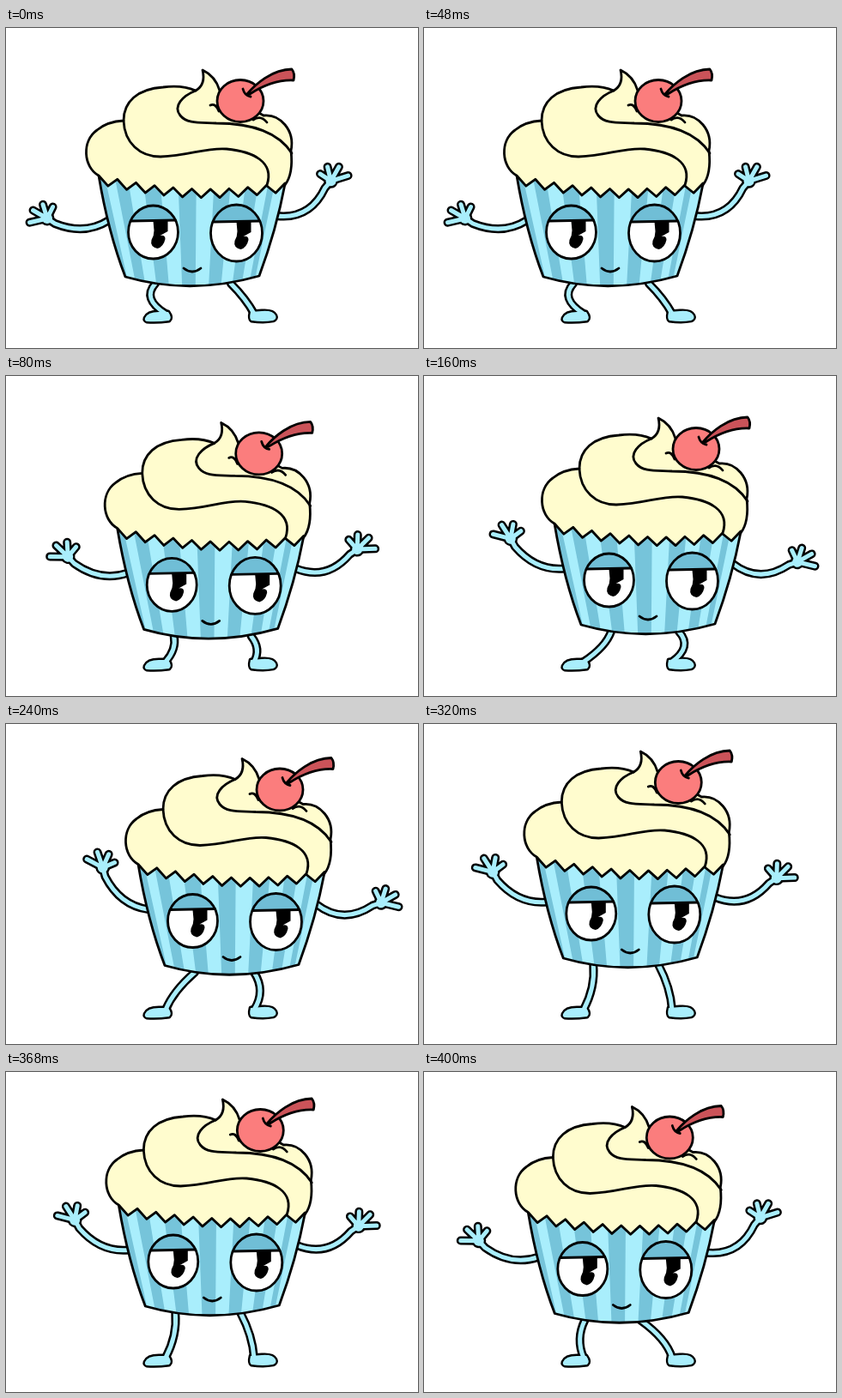
Write an HTML page that moves like this. It is 480 px wide and 373 px high and loops after 480 ms.

```html
<!DOCTYPE html>
<html lang="en">
<head>
<meta charset="utf-8">
<title>Dancing cupcake</title>
<style>
html, body { margin: 0; width: 100%; height: 100%; overflow: hidden; background: #fff; }
svg { display: block; width: 100%; height: 100%; }
path, ellipse { stroke-linecap: round; stroke-linejoin: round; }
.ink { fill: none; stroke: #000; stroke-width: 2.8; }
</style>
</head>
<body>
<svg viewBox="0 0 480 373">
  <g id="legs"></g>
  <g id="body">
    <g id="armL"></g>
    <g id="armR"></g>
    <clipPath id="cupClip"><use href="#cup"/></clipPath>
    <path id="cup" d="M108 172Q119 238 139 290Q215 312 295 289Q315 235 325 182Z" fill="#a9eefc"/>
    <path id="stripes" clip-path="url(#cupClip)" fill="#76c4da"/>
    <path class="ink" d="M108 172Q119 238 139 290Q215 312 295 289Q315 235 325 182"/>
    <path id="cream" class="ink" style="fill:#fffcce"/>
    <path class="ink" d="M137 108C138 134 156 150 180 150C214 149 232 139 257 141C288 144 313 156 304 183
      M221 73C206 79 194 91 203 102C211 112 226 110 245 111C285 111 317 121 333 146
      M238 90Q244 87 248 97M288 107Q297 101 304 110"/>
    <ellipse cx="273" cy="85" rx="27" ry="24.5" class="ink" style="fill:#fb7d7d"/>
    <path class="ink" style="fill:#cb5359" d="M281 77C290 66 310 48 333 48Q337 53 335 61C315 60 298 68 284 77Z"/>
    <path class="ink" d="M276 71Q278 79 285 80"/>
    <g id="eyes"></g>
    <path class="ink" d="M207 280Q217 288 227 280"/>
  </g>
</svg>
<script>
const $ = id => document.getElementById(id);
const SKIN = '#a9eefc';

// Outlined limb: a black layer below a slimmer coloured one.
const stroke = (d, color, width) => `<path d="${d}" fill="none" stroke="${color}" stroke-width="${width}"/>`;
const limb = (line, blob) => stroke(line, '#000', 10) +
  `<path d="${blob}" stroke="#000" stroke-width="4.8"/>` +
  stroke(line, SKIN, 5) + `<path d="${blob}" fill="${SKIN}"/>`;

// Arm ending in a palm with four fingers fanned out from an angle in degrees.
function arm(line, x, y, angle, turn) {
  for (let i = 0; i < 4; i++) {
    const a = (angle + turn * i * 43) * Math.PI / 180, r = 21 - 2 * i;
    line += `M${x} ${y}L${x + r * Math.cos(a)} ${y + r * Math.sin(a)}`;
  }
  return limb(line, `M${x - 6} ${y}a6 6 0 1 1 12 0a6 6 0 1 1 -12 0Z`);
}
$('armL').innerHTML = arm('M120 224Q92 242 57 228L48 222', 48, 222, 167, 1);
$('armR').innerHTML = arm('M315 219Q354 224 372 187L379 179', 379, 179, -17, -1);

const eye = (x, y, rx, ry) => `
  <g transform="translate(${x} ${y})">
    <ellipse rx="${rx}" ry="${ry}" fill="#fff"/>
    <path d="M${3 - rx} -14A${rx} ${ry} 0 0 1 ${rx - 3} -14Z" fill="#70bed6"/>
    <path d="M0 -13H17V-1L8 4Q14 3 14 8Q12 17 5 19Q-4 17 -2 9Q1 4 1 -2Z"/>
    <path class="ink" d="M${3 - rx} -13L${rx - 3} -14"/>
    <ellipse rx="${rx}" ry="${ry}" class="ink"/>
  </g>`;
$('eyes').innerHTML = eye(171.5, 238, 29, 31) + eye(268.5, 239, 30, 33);

// Stripes evenly spaced around a tapering cylinder.
let stripes = '';
for (let a = -1.2; a < 1.3; a += 0.4) {
  const l = Math.sin(a - 0.1), r = Math.sin(a + 0.1);
  stripes += `M${211 + 108 * l} 172L${211 + 108 * r} 172L${213 + 78 * r} 302L${213 + 78 * l} 302Z`;
}
$('stripes').setAttribute('d', stripes);

// Toothed lower rim of the cream, from right to left.
let rim = '';
for (let i = 20; i >= 0; i--) {
  const y = 172 + 9 * i / 20 + 11 * Math.sin(Math.PI * i / 20) + i % 2 * 10;
  rim += `L${108 + i * 10.85} ${y}`;
}
$('cream').setAttribute('d', `M108 172C90 162 88 132 106 119Q118 109 137 108
  C137 86 153 71 183 69Q205 66 221 73Q233 66 229 49Q244 56 249 73L300 102
  C319 100 337 119 332 143Q335 170 325 183${rim}Z`);

const footL = 'M162 338Q165 331 178 331L189 331Q194 338 190 341Q176 343 164 342Q161 341 162 338Z';
const footR = 'M285 331Q283 339 286 341Q300 343 311 341Q316 339 314 335Q311 329 298 330Z';

// Leg curving from hip to ankle, its middle pushed sideways by bend.
const leg = (hx, hy, ax, ay, bend) =>
  `M${hx} ${hy}Q${(hx + ax) / 2 + 2 * bend} ${(hy + ay) / 2} ${ax} ${ay}`;

// Body shift, left and right knee bend, right hip.
const poses = [
  [0, 0, -11, 2, 262],
  [21.7, 5.4, 4, 5, 264],
  [44, 0, 5, 10, 253],
  [46, -8.5, -4, 7, 243],
  [23.3, -17, 4, 3, 250],
  [13.3, -8.5, -5, 6, 239]
];

function pose(step) {
  const [x, y, bendL, bendR, hip] = poses[step];
  const left = 41 * (1 - Math.abs(step - 3) / 3);
  const right = 15 + 18 * Math.cos((step - 2.5) * Math.PI / 3);
  $('body').setAttribute('transform', `translate(${x} ${y})`);
  $('armL').setAttribute('transform', `rotate(${left} 119 224)`);
  $('armR').setAttribute('transform', `rotate(${right} 316 220)`);
  $('legs').innerHTML = limb(leg(174 + x, 298 + y, 186, 333, bendL), footL) +
    limb(leg(hip + x, 298 + y, 289, 333, bendR), footR);
}

let shown = -1;
function draw() {
  const step = Math.floor(performance.now() / 80) % poses.length;
  if (step !== shown) pose(shown = step);
  requestAnimationFrame(draw);
}
draw();
</script>
</body>
</html>
```
